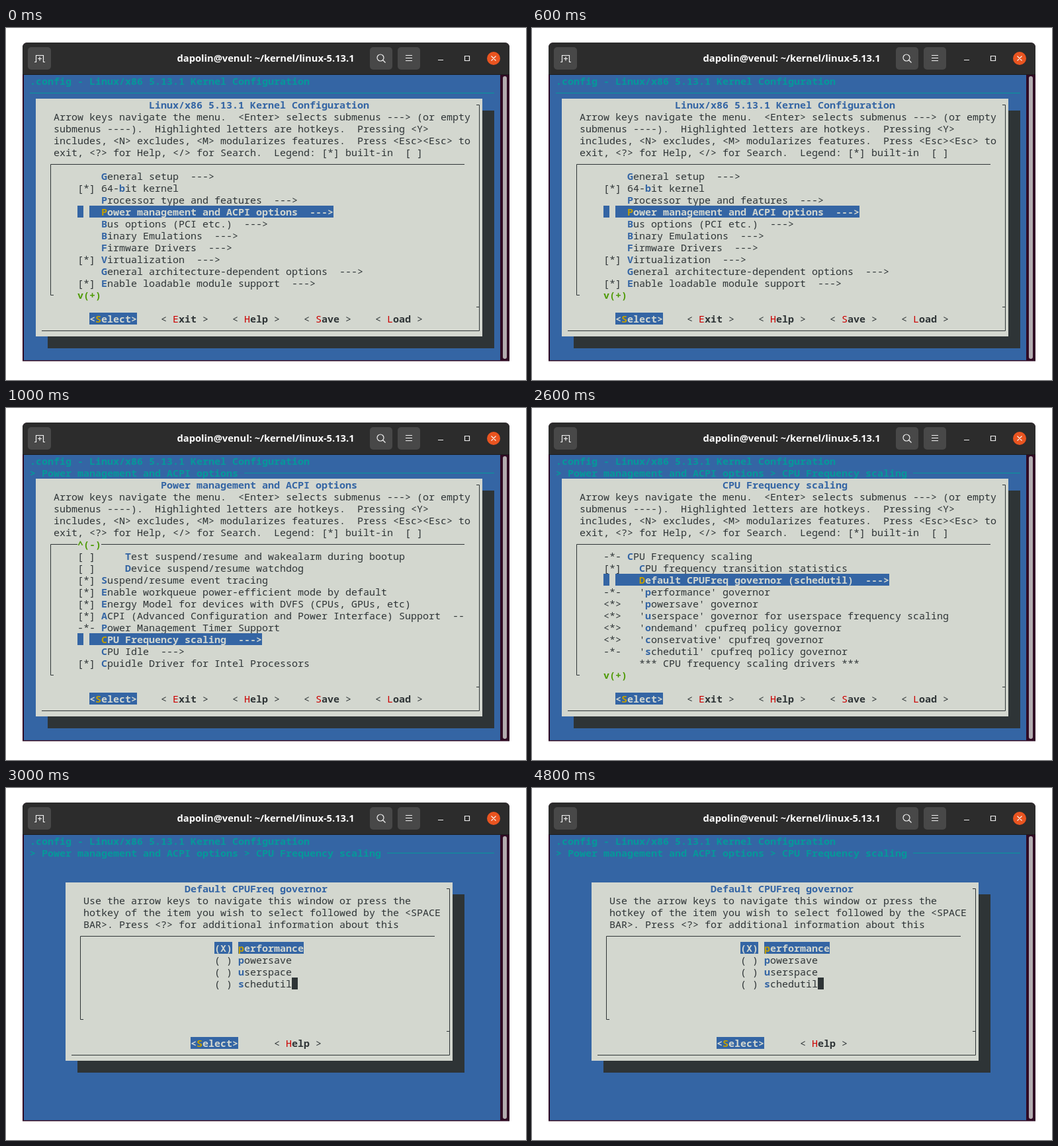
Animation, 786 px wide and 533 px high, one loop 6000 ms. Source, as an HTML page:

```html
<!DOCTYPE html>
<html lang="en">
<head>
<meta charset="utf-8">
<title>Kernel configuration</title>
<style>
html, body { margin: 0; width: 100%; height: 100%; overflow: hidden; background: #fff; }
svg { display: block; width: 786px; height: 533px; }
text { white-space: pre; }
.term text { font: 15px "Noto Sans Mono", "DejaVu Sans Mono", monospace; }
.term text.b { font-weight: 700; }
.title { font: 700 14.7px "Open Sans", "Noto Sans", sans-serif; fill: #fff; }
.icon { fill: none; stroke: #f2f2f2; stroke-width: 1.2; }
</style>
</head>
<body>
<svg viewBox="0 0 786 533">
  <path d="M25 504.500V30q0-8 8-8H753q8 0 8 8V504.500z" fill="#300a24"/>
  <path d="M25 70V30q0-8 8-8H753q8 0 8 8V70z" fill="#2c2c2c"/>
  <path d="M25 70.500H761" stroke="#1c1c1c"/>
  <g fill="#484848">
    <rect x="33" y="29" width="35" height="34" rx="5"/>
    <rect x="550" y="29" width="34" height="34" rx="5"/>
    <rect x="592" y="29" width="34" height="34" rx="5"/>
  </g>
  <circle cx="737" cy="46" r="10" fill="#e95420"/>
  <g class="icon">
    <path d="M43 51.500h2.500v-10h11v10h2.500M51 43.500v6M48 46.500h6"/>
    <circle cx="566" cy="45" r="5"/>
    <path d="M569.500 48.500l4 4M604 41.500h10M604 45.500h10M604 49.500h10M653 48.500h8"/>
    <path d="M693.500 42.500h7v7h-7zM733.500 42.500l7 7M740.500 42.500l-7 7"/>
  </g>
  <text class="title" x="392.500" y="51" text-anchor="middle">dapolin@venul: ~/kernel/linux-5.13.1</text>
  <rect x="27" y="71" width="720" height="432" fill="#3465a4"/>
  <rect x="751" y="73" width="6" height="428" rx="3" fill="#b3acb0"/>
  <g class="term"></g>
</svg>
<script>
const CW = 9, CH = 18, LOOP = 6000;
const INK = '#2e3436', PAPER = '#d3d7cf', BLUE = '#3465a4', CYAN = '#06989a',
      RED = '#cc0000', GREEN = '#4e9a06', GOLD = '#c4a000';
const px = c => 27 + c * CW, py = r => 71 + r * CH;
const term = document.querySelector('.term');
let layer;

function add(tag, attrs) {
  const el = document.createElementNS('http://www.w3.org/2000/svg', tag);
  for (const k in attrs) el.setAttribute(k, attrs[k]);
  return layer.appendChild(el);
}

const fill = (c, r, w, h, color) =>
  add('rect', { x: px(c), y: py(r), width: w * CW, height: h * CH, fill: color });

const line = (d, color = INK) => add('path', { d, stroke: color, fill: 'none' });

function put(c, r, s, color = INK, bold = false) {
  const pad = s.length - s.trimStart().length;
  if (pad === s.length) return;
  add('text', { x: px(c + pad), y: py(r) + 15, fill: color, class: bold ? 'b' : '' })
    .textContent = s.trim();
}

// A tilde marks the hotkey letter that follows it.
function keyed(c, r, s, key = BLUE, ink = INK, bold = false) {
  const i = s.indexOf('~');
  if (i < 0) return put(c, r, s, ink, bold);
  put(c, r, s.slice(0, i), ink, bold);
  put(c + i, r, s[i + 1], key, true);
  put(c + i + 1, r, s.slice(i + 2), ink, bold);
}

function lit(c, r, s) {
  fill(c, r, s.replace('~', '').length, 1, BLUE);
  keyed(c, r, s, GOLD, PAPER, true);
}

function button(c, r, name) {
  put(c, r, '<');
  put(c + 2, r, name[0], RED);
  put(c + 3, r, name.slice(1), INK, true);
  put(c + 7, r, '>');
}

function heading(path) {
  put(1, 0, '.config - Linux/x86 5.13.1 Kernel Configuration', CYAN, true);
  put(1, 1, path, CYAN, true);
  line(`M${px(path ? path.length + 2 : 1)} 98.500H738`, CYAN);
}

function dialog(c, r, w, h, top, titleCol, title, help) {
  const x = k => px(k) + 4.5, y = k => py(k) + 9.5;
  const right = c + w - 1, low = r + h - 1;
  fill(c + 2, r + 1, w, h, INK);
  fill(c, r, w, h, PAPER);
  line(`M${px(right)} ${y(r)}H${x(right)}V${y(low)}H${px(c + 1)}` +
       `M${px(right)} ${y(low - 2)}H${x(right)}`);
  line(`M${px(c + w - 3)} ${y(top)}H${x(c + 2)}V${y(low - 3)}H${px(c + 3)}`);
  put(titleCol, r, title, BLUE, true);
  help.forEach((s, i) => put(c + 3, r + 1 + i, s));
}

const MENU_HELP = [
  'Arrow keys navigate the menu.  <Enter> selects submenus ---> (or empty',
  'submenus ----).  Highlighted letters are hotkeys.  Pressing <Y>',
  'includes, <N> excludes, <M> modularizes features.  Press <Esc><Esc> to',
  'exit, <?> for Help, </> for Search.  Legend: [*] built-in  [ ]'
];

function menu({ path, col, title, items, pick, up, down }) {
  heading(path);
  dialog(2, 2, 75, 20, 7, col, title, MENU_HELP);
  items.forEach((s, i) => {
    if (i !== pick) return keyed(9, 8 + i, s);
    fill(9, 8 + i, 1, 1, BLUE);
    lit(11, 8 + i, s.slice(2));
  });
  if (up) {
    fill(9, 7, 4, 1, PAPER);
    put(9, 7, '^(-)', GREEN, true);
  }
  if (down) put(9, 18, 'v(+)', GREEN, true);
  lit(11, 20, '<~Select>');
  ['Exit', 'Help', 'Save', 'Load'].forEach((s, i) => button(23 + 12 * i, 20, s));
}

const POWER = '> Power management and ACPI options';
const FREQ = POWER + ' > CPU Frequency scaling';

function governor() {
  heading(FREQ);
  dialog(7, 4, 65, 15, 8, 27, 'Default CPUFreq governor', [
    'Use the arrow keys to navigate this window or press the',
    'hotkey of the item you wish to select followed by the <SPACE',
    'BAR>. Press <?> for additional information about this'
  ]);
  lit(32, 9, '(X)');
  lit(36, 9, '~performance');
  ['powersave', 'userspace', 'schedutil'].forEach((s, i) => keyed(32, 10 + i, '( ) ~' + s));
  fill(45, 12, 1, 1, INK);
  lit(28, 17, '<~Select>');
  button(42, 17, 'Help');
}

const scenes = [
  [0, () => menu({
    path: '', col: 21, title: 'Linux/x86 5.13.1 Kernel Configuration', pick: 3, down: true,
    items: [
      '    ~General setup  --->',
      '[*] 64-~bit kernel',
      '    ~Processor type and features  --->',
      '    ~Power management and ACPI options  --->',
      '    ~Bus options (PCI etc.)  --->',
      '    ~Binary Emulations  --->',
      '    ~Firmware Drivers  --->',
      '[*] ~Virtualization  --->',
      '    ~General architecture-dependent options  --->',
      '[*] ~Enable loadable module support  --->'
    ]
  })],
  [1000, () => menu({
    path: POWER, col: 23, title: POWER.slice(2), pick: 7, up: true,
    items: [
      '[ ]     ~Test suspend/resume and wakealarm during bootup',
      '[ ]     ~Device suspend/resume watchdog',
      '[*] ~Suspend/resume event tracing',
      '[*] ~Enable workqueue power-efficient mode by default',
      '[*] ~Energy Model for devices with DVFS (CPUs, GPUs, etc)',
      '[*] ~ACPI (Advanced Configuration and Power Interface) Support  --',
      '-*- ~Power Management Timer Support',
      '    ~CPU Frequency scaling  --->',
      '    ~CPU Idle  --->',
      '[*] ~Cpuidle Driver for Intel Processors'
    ]
  })],
  [2000, () => menu({
    path: FREQ, col: 29, title: 'CPU Frequency scaling', pick: 2, down: true,
    items: [
      '-*- ~CPU Frequency scaling',
      '[*]   ~CPU frequency transition statistics',
      '      ~Default CPUFreq governor (schedutil)  --->',
      "-*-   '~performance' governor",
      "<*>   '~powersave' governor",
      "<*>   '~userspace' governor for userspace frequency scaling",
      "<*>   '~ondemand' cpufreq policy governor",
      "<*>   '~conservative' cpufreq governor",
      "-*-   '~schedutil' cpufreq policy governor",
      '      *** CPU frequency scaling drivers ***'
    ]
  })],
  [3000, governor]
];

scenes.forEach(([, draw], i) => {
  layer = term;
  layer = add('g', { opacity: 0 });
  draw();
  const steps = scenes.map(([t], j) =>
    ({ offset: t / LOOP, opacity: +(i === j), easing: 'step-end' }));
  steps.push({ offset: 1, opacity: +(i === 0) });
  layer.animate(steps, { duration: LOOP, iterations: Infinity });
});
</script>
</body>
</html>
```
